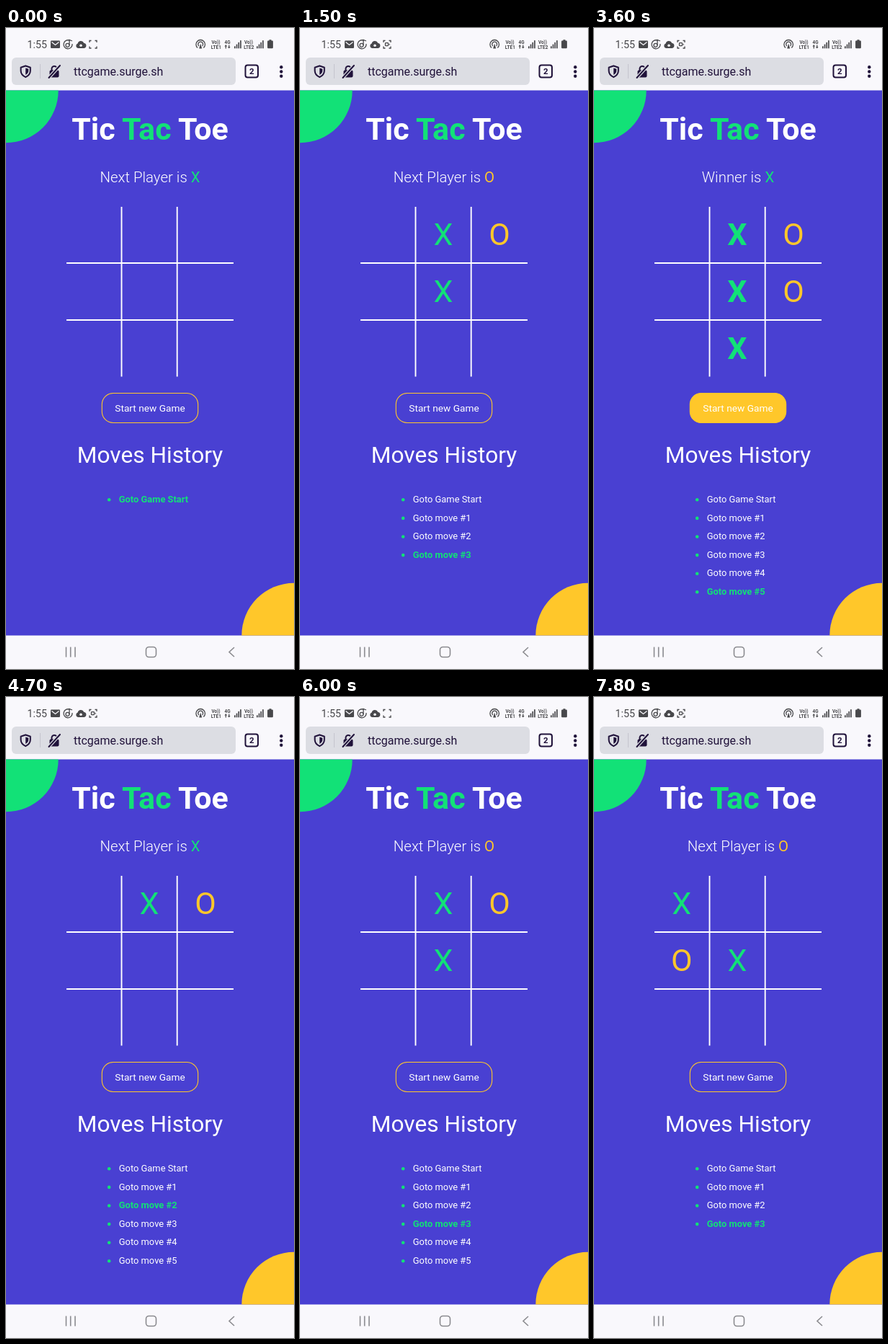
An HTML page for the animation above (8 s loop, 400 by 889 pixels).

```html
<!DOCTYPE html>
<html lang="en">
<head>
<meta charset="utf-8">
<title>Tic Tac Toe</title>
<style>
  html, body { margin: 0; width: 100%; height: 100%; overflow: hidden; background: #4940d2; }
  svg { display: block; width: 100vw; height: 100vh; font-family: Roboto, Inter, sans-serif; }
  text { fill: #fff; white-space: pre; }
  .mid { text-anchor: middle; }
  .dark { fill: #20123a; }
  .tiny { font-size: 6.4px; font-weight: 700; fill: #48484b; text-anchor: middle; }
  .line { fill: none; stroke-width: 1.3; }
  .cell { font-size: 43px; text-anchor: middle; }
  .move { font-size: 12.9px; }
</style>
</head>
<body>
<svg id="stage" viewBox="0 0 400 889" preserveAspectRatio="none">
  <rect width="400" height="889" fill="#f9f8fc"/>

  <g id="status" fill="#48484b" stroke="#48484b" stroke-width="0">
    <text x="29.5" y="28" font-size="14.2" style="fill:#48484b">1:55</text>
    <rect x="62" y="17.5" width="13" height="10.5" rx="1.2"/>
    <path d="M63.5 19.5l5 4 5-4" class="line" style="stroke:#f9f8fc"/>
    <g class="line">
      <path d="M88.500 17.300A6 6 0 1 0 92 22"/>
      <circle cx="85.500" cy="23.800" r="2.500"/>
      <path d="M88 23.800v-7.300l4 1.500"/>
    </g>
    <path d="M100 28a3.300 3.300 0 0 1-.4-6.400 4.600 4.600 0 0 1 8.700-.7 3.600 3.600 0 0 1 .2 7.100z"/>
    <circle cx="104" cy="24.300" r="1.800" fill="#f9f8fc"/>
    <path class="line" d="M116 20v-2.500h2.500M123.500 17.500h2.500v2.500M126 25.500v2.500h-2.500M118.500 28h-2.500v-2.500"/>
    <g id="rec">
      <rect class="line" x="118.500" y="20.700" width="4" height="4" rx=".8"/>
      <path d="M123 22.700l1.700-1.200v2.600z"/>
    </g>
    <path class="line" d="M266 27.500a6.300 6.300 0 1 1 8.400 0M267.800 25a3.400 3.400 0 1 1 4.800 0"/>
    <path d="M270.200 21.500l2 7h-4z"/>
    <text class="tiny" x="291.500" y="21.500">Vo))</text>
    <text class="tiny" x="291.800" y="28.500">LTE1</text>
    <text class="tiny" x="307.500" y="21.500">4G</text>
    <path d="M303.500 25.500l1.800-2.500 1.800 2.500h-1.200v3h-1.200v-3zM308 26l1.800 2.500 1.800-2.500h-1.200v-2.500h-1.200v2.500z"/>
    <text class="tiny" x="337" y="21.500">Vo))</text>
    <text class="tiny" x="337.300" y="28.500">LTE2</text>
    <g id="bars"></g>
    <path d="M365.500 17.500v-1.300h3v1.300h1.200a1.200 1.200 0 0 1 1.200 1.200v8.400a1.200 1.200 0 0 1-1.200 1.200h-5.400a1.200 1.200 0 0 1-1.200-1.200v-8.400a1.200 1.200 0 0 1 1.200-1.200z"/>
  </g>

  <g id="toolbar">
    <rect x="8" y="41" width="311" height="38" rx="6" fill="#dcdde3"/>
    <path d="M27.200 52.500l6.600 2.200v4.500c0 4.300-2.600 7-6.600 9-4-2-6.600-4.700-6.600-9v-4.500z" fill="none" stroke="#20123a" stroke-width="2" stroke-linejoin="round"/>
    <path class="dark" d="M27.200 55.500v9.500c2.600-1.500 4-3.200 4-6v-2.200z"/>
    <path d="M47.500 50v20" stroke="#c5c5ce"/>
    <rect class="dark" x="60.500" y="58.500" width="13" height="10" rx="2"/>
    <path d="M63.500 59v-2.500a3.600 3.600 0 0 1 7.200 0v2.500" fill="none" stroke="#20123a" stroke-width="2"/>
    <path d="M59 69.500l15.500-17" stroke="#dcdde3" stroke-width="4.500"/>
    <path d="M59.500 69l15.500-17" stroke="#20123a" stroke-width="2" stroke-linecap="round"/>
    <text class="dark" x="94" y="66" font-size="16">ttcgame.surge.sh</text>
    <rect x="332.500" y="51.500" width="17.500" height="17" rx="3" fill="none" stroke="#20123a" stroke-width="2"/>
    <text class="dark mid" x="341.200" y="64.200" font-size="11.500" font-weight="700">2</text>
    <g class="dark">
      <circle cx="382.300" cy="54.300" r="2.200"/>
      <circle cx="382.300" cy="60.500" r="2.200"/>
      <circle cx="382.300" cy="66.700" r="2.200"/>
    </g>
  </g>

  <clipPath id="page"><rect y="86.500" width="400" height="756"/></clipPath>
  <g clip-path="url(#page)">
    <rect y="86" width="400" height="757" fill="#4940d2"/>
    <circle cx="0" cy="86.500" r="72.700" fill="#12e177"/>
    <circle cx="400" cy="842.500" r="72.700" fill="#ffc72a"/>
  </g>

  <text class="mid" x="200" y="155.300" font-size="43" font-weight="700">Tic <tspan fill="#12e177">Tac</tspan> Toe</text>
  <text class="mid" x="200" y="214" font-size="20.400" font-weight="300"><tspan id="label"></tspan><tspan id="player" font-weight="400"></tspan></text>
  <path d="M160.500 248v235.500M237.700 248v235.500M84 326h232M84 405h232" stroke="#fff" stroke-width="1.900"/>
  <g id="board"></g>
  <rect id="reset" x="133.300" y="506.500" width="133.400" height="41" rx="15.500" fill="#ffc72a" stroke="#ffc72a" stroke-width="1.100"/>
  <text class="mid" x="200" y="532" font-size="13.700">Start new Game</text>
  <text class="mid" x="200" y="603" font-size="31.700">Moves History</text>
  <g id="list"></g>

  <g fill="none" stroke="#8b8b8f" stroke-width="1.600">
    <path d="M83.500 858.500v14M89.700 858.500v14M96 858.500v14"/>
    <rect x="194.500" y="858.500" width="14" height="14" rx="4"/>
    <path d="M317 859l-7 6.500 7 6.500"/>
  </g>
</svg>
<script>
  const LOOP = 8000, STEP = 100, FADE = 200;
  const GREEN = [18, 225, 119], ORANGE = [255, 199, 42];
  const WIN = [1, 4, 7];

  // Squares in playing order; X always starts.
  const first = [1, 2, 4, 5, 7], second = [0, 3, 4];

  // [time, game, moves in the list, selected move]
  const steps = [
    [0, first, 0, 0],
    [100, first, 1, 1],
    [500, first, 2, 2],
    [1200, first, 3, 3],
    [1900, first, 4, 4],
    [2500, first, 5, 5],
    [4300, first, 5, 1],
    [4700, first, 5, 2],
    [5300, first, 5, 3],
    [6200, second, 0, 0],
    [6800, second, 1, 1],
    [7200, second, 2, 2],
    [7600, second, 3, 3]
  ];

  const $ = id => document.getElementById(id);
  const add = (parent, tag, attrs, text = '') => {
    const el = document.createElementNS('http://www.w3.org/2000/svg', tag);
    for (const k in attrs) el.setAttribute(k, attrs[k]);
    el.textContent = text;
    return parent.appendChild(el);
  };
  const mix = (a, b, p) => `rgb(${a.map((v, i) => Math.round(v + (b[i] - v) * p))})`;
  const ease = v => Math.max(0, Math.min(1, v)) ** 1.2;

  for (const x of [317, 348]) {
    for (let i = 0; i < 4; i++) {
      const h = 3 + i * 2.7;
      add($('bars'), 'rect', { x: x + i * 2.7, y: 28.3 - h, width: 1.7, height: h });
    }
  }

  const cells = Array.from({ length: 9 }, (_, i) => add($('board'), 'text', {
    class: 'cell', x: [121.7, 199, 277][i % 3], y: 301.4 + 79 * Math.floor(i / 3)
  }));

  const rows = Array.from({ length: 6 }, (_, i) => {
    const g = add($('list'), 'g', {}), y = 658 + i * 25.6;
    add(g, 'circle', { cx: 143.2, cy: y - 3.7, r: 2.3, fill: '#12e177' });
    const text = add(g, 'text', { class: 'move', x: 156.8, y }, i ? 'Goto move #' + i : 'Goto Game Start');
    return { g, text };
  });

  const isWon = s => s[1] === first && s[3] === 5;

  function draw(time) {
    const t = Math.floor(time / STEP) * STEP;
    let n = steps.length - 1;
    while (steps[n][0] > t) n--;
    const now = steps[n], before = steps[n - 1] || now;
    const [start, game, count, move] = now;
    const p = ease((t - start) / FADE), won = isWon(now);

    cells.forEach((cell, i) => {
      const k = game.indexOf(i), on = k >= 0 && k < move, isX = k % 2 === 0;
      const fresh = before[1] !== game || k >= before[3];
      cell.textContent = on ? (isX ? 'X' : 'O') : '';
      cell.style.fill = mix(ORANGE, GREEN, isX ? (fresh ? p : 1) : 0);
      cell.style.fontWeight = won && WIN.includes(i) ? 700 : 400;
    });

    const nextX = won || move % 2 === 0;
    $('label').textContent = won ? 'Winner is ' : 'Next Player is ';
    $('player').textContent = nextX ? 'X' : 'O';
    $('player').style.fill = nextX ? '#12e177' : '#ffc72a';

    const wasWon = n > 0 && isWon(before);
    $('reset').style.fillOpacity = won ? p : wasWon ? 1 - p : 0;
    $('reset').style.strokeOpacity = won ? p : 1;

    rows.forEach(({ g, text }, i) => {
      g.style.display = i <= count ? '' : 'none';
      text.style.fill = i === move ? '#12e177' : '#fff';
      text.style.fontWeight = i === move ? 600 : 400;
    });

    $('rec').style.display = t % 1000 < 500 ? 'none' : '';
  }

  const origin = performance.now();
  function frame() {
    draw((performance.now() - origin) % LOOP);
    requestAnimationFrame(frame);
  }
  frame();
</script>
</body>
</html>
```
